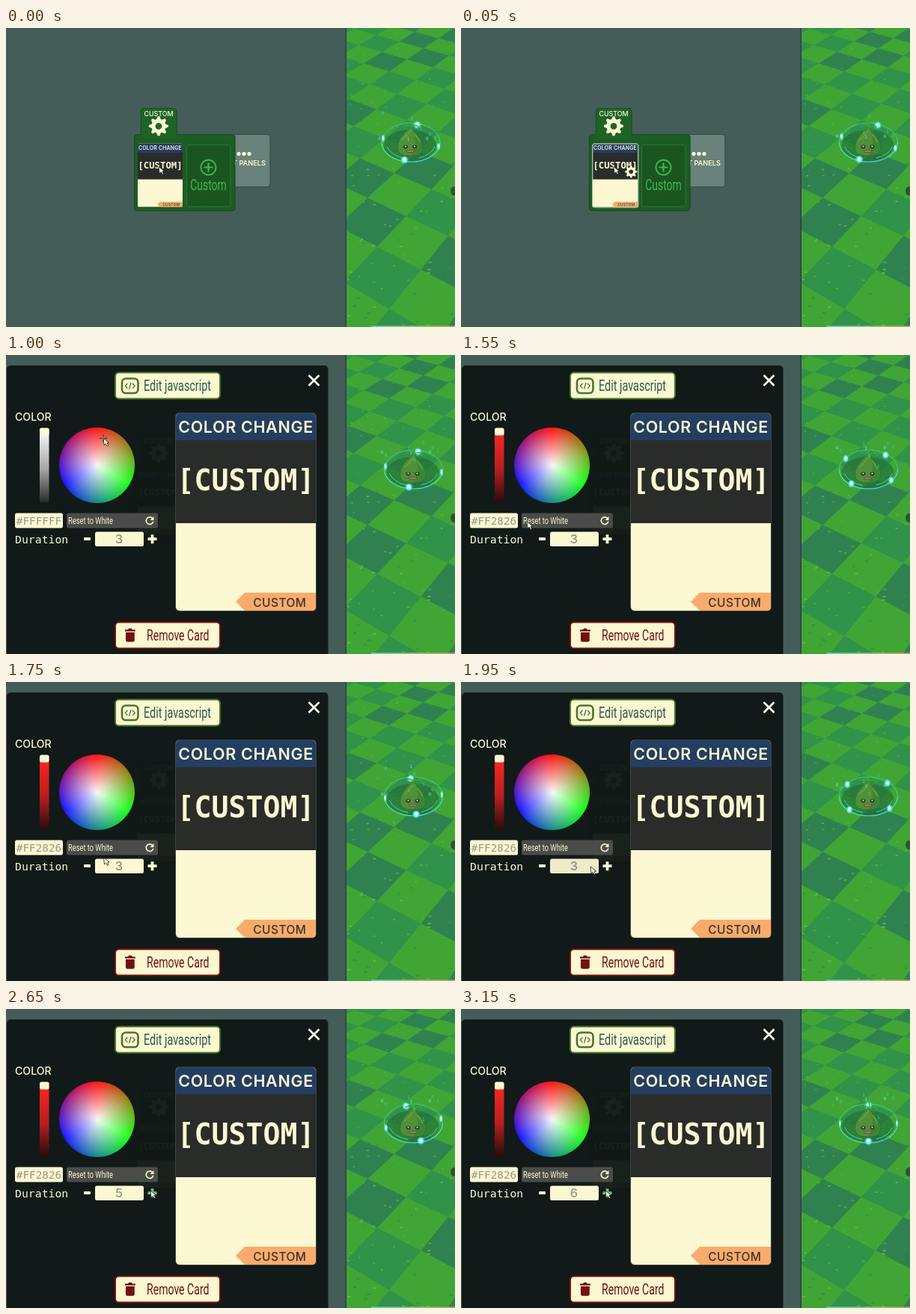
Write an HTML page with a canvas that moves like this. It is 600 by 400 pixels and loops after 3900 ms.

```html
<!DOCTYPE html>
<html lang="en">
<head>
<meta charset="utf-8">
<title>Card editor</title>
<style>
  html, body { margin: 0; width: 100%; height: 100%; overflow: hidden; background: #445d58; }
  canvas { display: block; }
</style>
</head>
<body>
<canvas id="stage" width="600" height="400"></canvas>
<script>
const stage = document.getElementById('stage');
const view = stage.getContext('2d');
let g = view;

const LOOP = 3900, TAU = Math.PI * 2;
const CREAM = '#fbf8d2', NAVY = '#243e62', INK = '#2a2c2a', ORANGE = '#f9ab6c';
const GEO = 'Inter, sans-serif';
const MONO = '"DejaVu Sans Mono", monospace';
const CONDENSED = 0.69;

// Moments at which the picture changes.
const run = (from, to) => Array.from({ length: (to - from) / 50 + 1 }, (_, i) => from + i * 50);
const TICKS = [0, 50, ...run(800, 1050), ...run(1550, 2150), 2650, 3150];

const lerp = (a, b, p) => a + (b - a) * p;
const ease = p => p * p * (3 - 2 * p);

// Value of [time, ...numbers] keys at time t.
function track(keys, t, shape = p => p) {
  if (t <= keys[0][0]) return keys[0].slice(1);
  for (let i = 1; i < keys.length; i++) {
    const [a, b] = [keys[i - 1], keys[i]];
    if (t < b[0]) {
      const p = shape((t - a[0]) / (b[0] - a[0]));
      return a.slice(1).map((v, n) => lerp(v, b[n + 1], p));
    }
  }
  return keys[keys.length - 1].slice(1);
}

function random(seed) {
  return () => (seed = (seed * 16807) % 2147483647) / 2147483647;
}

function paint(fill, line, width = 1) {
  if (fill) { g.fillStyle = fill; g.fill(); }
  if (line) { g.strokeStyle = line; g.lineWidth = width; g.stroke(); }
}

function box(x, y, w, h, r, fill, line, width) {
  g.beginPath();
  g.roundRect(x, y, w, h, r);
  paint(fill, line, width);
}

function poly(points, fill, line, width) {
  g.beginPath();
  points.forEach(p => g.lineTo(...p));
  g.closePath();
  paint(fill, line, width);
}

function path(d, fill, line, width) {
  const p = new Path2D(d);
  if (fill) { g.fillStyle = fill; g.fill(p, 'evenodd'); }
  if (line) { g.strokeStyle = line; g.lineWidth = width; g.stroke(p); }
}

function disc(x, y, rx, ry, fill, line, width) {
  g.beginPath();
  g.ellipse(x, y, rx, ry, 0, 0, TAU);
  paint(fill, line, width);
}

function text(s, x, y, font, fill, align = 'center') {
  g.font = font;
  g.fillStyle = fill;
  g.textAlign = align;
  g.textBaseline = 'alphabetic';
  g.fillText(s, x, y);
}

function narrow(s, x, y, size, fill, align) {
  g.save();
  g.translate(x, y);
  g.scale(CONDENSED, 1);
  text(s, 0, 0, `${size}px Roboto, sans-serif`, fill, align);
  g.restore();
}

function gear(x, y, r) {
  g.beginPath();
  for (let i = 0; i < 32; i++) {
    const k = i % 4 < 2 ? 1 : 0.74;
    const a = (i - 0.5) / 32 * TAU;
    g.lineTo(x + Math.cos(a) * r * k, y + Math.sin(a) * r * k);
  }
  g.closePath();
  g.moveTo(x + r * 0.34, y);
  g.arc(x, y, r * 0.34, 0, TAU);
  g.fillStyle = CREAM;
  g.fill('evenodd');
}

function cursor(x, y) {
  g.save();
  g.translate(x, y);
  path('M0 0L1 9L3.2 7.2L5 10.5L6.6 9.6L5 6.4L7.6 6Z', '#fffbe8', '#111a18', 0.8);
  g.restore();
}

// Checkered lawn in perspective.
function drawLawn() {
  const rnd = random(77);
  const project = (x, d) => {
    const depth = 5030 / d;
    return [540 + x * depth * 0.16, depth - 320];
  };
  const turn = Math.PI / 4 + 0.2, c = Math.cos(turn) * 0.707, s = Math.sin(turn) * 0.707;
  const distance = (i, j) => 7.72 + i * s + j * c;
  const corner = (i, j) => project(-0.35 + i * c - j * s, distance(i, j));

  g.save();
  g.beginPath();
  g.rect(455, 0, 145, 400);
  g.clip();
  g.fillStyle = '#40a535';
  g.fillRect(455, 0, 145, 400);
  const ring = [[-.5, -.5], [.5, -.5], [.5, .5], [-.5, .5]];
  for (let i = -6; i < 18; i++) {
    for (let j = -6; j < 18; j++) {
      const shade = rnd();
      if ((i + j) % 2 || distance(i, j) < 2) continue;
      poly(ring.map(([a, b]) => corner(i + a, j + b)), shade < 0.5 ? '#2f8250' : '#31924a');
    }
  }
  for (let i = 0; i < 150; i++) {
    const y = rnd() * 400, size = 1 + y / 250;
    g.fillStyle = ['#62b83c', '#2f9440', '#4caf38'][i % 3];
    g.fillRect(455 + rnd() * 145, y, size * (1 + rnd()), size * 0.8);
  }
  disc(599, 218, 5, 6, '#2b5336');
  const strip = g.createLinearGradient(488, 0, 600, 0);
  strip.addColorStop(0, '#63d8c3');
  strip.addColorStop(0.5, '#9fc77a');
  strip.addColorStop(1, '#d59a67');
  g.fillStyle = strip;
  g.fillRect(488, 398.5, 112, 1.5);
  g.restore();
  g.fillStyle = '#2c4142';
  g.fillRect(453.5, 0, 1.5, 400);
}

function drawCreature(tick) {
  const x = tick ? 544.5 : 541, y = 153;
  const [angle] = track([[0, 13], [1, 19], [2, 44], [8, 127], [16, 222], [21, 255], [22, 270]], tick);
  const orbs = [0, 1, 2, 3].map(i => {
    const a = (angle + i * 90) * TAU / 360;
    return { x: x + Math.cos(a) * 38, y: y + Math.sin(a) * 24, face: Math.abs(Math.sin(a)) };
  });
  // Flat plates that turn edge-on at the sides of the ring.
  const orb = o => {
    const w = 0.3 + 0.7 * o.face;
    disc(o.x, o.y, 5.4 * w, 5.2, 'rgba(60,215,215,.6)');
    disc(o.x, o.y, 3.6 * w, 3.8, '#8ff3ee');
    disc(o.x, o.y - 0.6, 1.8 * w, 2, '#e6fffb');
  };
  const arc = (rx, ry, from, to, line, width) => {
    g.beginPath();
    g.ellipse(x, y, rx, ry, 0, from, to);
    paint(null, line, width);
  };

  disc(x - 1, y + 4, 35, 21, 'rgba(32,108,58,.62)');
  arc(39, 26, Math.PI, TAU, '#36cda0', 1);
  orbs.filter(o => o.y < y).forEach(orb);

  g.save();
  g.translate(x - 1, y);
  path('M-17 7C-17 -5 -8 -12 2 -22C5 -12 17 -6 17 6C17 16 9 18 0 18S-17 16 -17 7Z', '#4f9038', '#2b7238', 1);
  path('M2 -22C6 -11 18 -5 16 8C13 17 6 17 1 17C10 5 7 -8 2 -22Z', 'rgba(45,125,43,.55)');
  path('M-11 -3C-6 -7 -4 -9 1 -16M6 -11C11 -6 12 -3 13 0', null, '#74a846', 1.2);
  path('M2 -21C1 -28 3 -32 4 -35M2 -20Q-5 -26 -10 -21M2 -20Q9 -26 13 -18', null, '#36ad35', 1.3);
  for (const ex of [-6, 6]) {
    disc(ex, 6, 3, 2.4, '#263c30');
    disc(ex, 5.5, 1.1, 1, '#e9e5c2');
  }
  path('M-6 11Q0 9 6 11L4 14H-4Z', '#70513e');
  path('M-4 12H4', null, '#cfa58a', 1);
  g.restore();

  arc(39, 26, 0, Math.PI, '#48e0d0', 1.2);
  arc(33, 22, 0.25, 1.25, '#43d5bb', 1);
  arc(33, 22, 1.8, 2.9, '#43d5bb', 1);
  orbs.filter(o => o.y >= y).forEach(orb);

  const rnd = random(31);
  for (let i = 0; i < 9; i++) {
    const px = x + (rnd() - 0.5) * 84;
    const rise = (rnd() * 38 + tick * 3) % 38;
    text(i % 2 ? '1' : '0', px, y - rise, `6px ${MONO}`, i % 3 ? '#37cfaa' : '#6bebdf');
  }
}

function card(x, y, w, h, head, dark, tagW, tagH, sizes, baselines) {
  g.save();
  g.beginPath();
  g.roundRect(x, y, w, h, w / 38);
  g.clip();
  g.fillStyle = CREAM;
  g.fillRect(x, y, w, h);
  g.fillStyle = NAVY;
  g.fillRect(x, y, w, head);
  g.fillStyle = INK;
  g.fillRect(x, y + head, w, dark);
  const r = x + w, b = y + h;
  poly([[r, b - tagH], [r - tagW + tagH / 2, b - tagH], [r - tagW, b - tagH / 2],
        [r - tagW + tagH / 2, b], [r, b]], ORANGE);
  const mid = x + w / 2;
  text('[CUSTOM]', mid, y + baselines[1], `700 ${sizes[1]}px ${MONO}`, CREAM);
  g.letterSpacing = `${sizes[0] * 0.03}px`;
  text('COLOR CHANGE', mid, y + baselines[0], `600 ${sizes[0]}px ${GEO}`, CREAM);
  g.letterSpacing = `${sizes[2] * 0.03}px`;
  text('CUSTOM', r - tagW * 0.45, y + baselines[2], `500 ${sizes[2]}px ${GEO}`, '#3b342d');
  g.restore();
}

function drawDeck(hover) {
  box(290, 142.5, 63, 70, 4, '#69827c', '#354b48', 1.2);
  for (const x of [311, 318, 325]) disc(x, 168.3, 2.6, 2.6, CREAM);
  text('EDIT PANELS', 347, 184, `600 9.2px ${GEO}`, CREAM, 'right');

  box(180.5, 107.5, 47.5, 45, 4, '#1f6427', '#1a4d25', 1.2);
  box(171.5, 142.5, 134.5, 102, 4, '#1d5c22', '#1a4a25', 1.2);
  box(181, 140, 46.5, 8, [0, 0, 3, 3], '#1f6427');
  text('CUSTOM', 204, 117.5, `500 8.9px ${GEO}`, CREAM);
  gear(204, 131.3, 13);

  card(176, 154.5, 60, 85, 12.5, 35.5, 34, 7, [6.9, 12.3, 5], [8.8, 33.2, 83.3]);
  if (hover) {
    box(175.8, 155, 61, 85, 2, null, '#dce5cf', 1);
    gear(227.3, 192.3, 8.2);
  }

  g.setLineDash([1.5, 1]);
  box(241.5, 156.5, 58.5, 82.5, 2, '#1a5520', '#348a3e', 1);
  g.setLineDash([]);
  disc(270.5, 186.5, 10, 10, null, '#40b84c', 1.8);
  path('M264.5 186.5h12M270.5 180.5v12', null, '#40b84c', 2.2);
  narrow('Custom', 270.5, 216.5, 20.2, '#40b84c');
}

function drawPicker(red, aim) {
  text('COLOR', 12, 87.5, `500 14.1px ${GEO}`, CREAM, 'left');

  const bar = g.createLinearGradient(0, 98, 0, 197);
  bar.addColorStop(0, red ? '#ff2826' : '#ffffff');
  bar.addColorStop(0.55, red ? '#b81f1e' : '#a5a7a6');
  bar.addColorStop(1, red ? '#2a0c0c' : '#292b2a');
  box(45, 98, 12.5, 99, 2, bar);
  box(45, 97.5, 12.5, 10, 2.5, CREAM);

  const cx = 121.5, cy = 147.5, r = 50.5;
  const hue = g.createConicGradient(-Math.PI / 2, cx, cy);
  ['#f00', '#0f0', '#00f', '#f00'].forEach((color, i) => hue.addColorStop(i / 3, color));
  disc(cx, cy, r, r, hue);
  const glow = g.createRadialGradient(cx, cy, 0, cx, cy, r);
  glow.addColorStop(0, 'rgba(255,255,255,.95)');
  glow.addColorStop(1, 'rgba(255,255,255,.08)');
  disc(cx, cy, r, r, glow);
  if (!red) {
    g.save();
    g.translate(...aim);
    path('M-5 0h3.4M1.6 0h3.4M0 -5v3.4M0 1.6v3.4', null, '#303430', 1.2);
    g.restore();
  }

  box(12, 211.5, 64, 20, 2.5, CREAM);
  text(red ? '#FF2826' : '#FFFFFF', 44, 227, `14.3px ${MONO}`, '#99988a');
  box(81, 211.5, 122, 20, 2.5, '#4b4c49');
  narrow('Reset to White', 83, 226.2, 13.5, CREAM, 'left');
  path('M195.6 218.4A4.8 4.8 0 1 0 196.8 222.6', null, CREAM, 1.7);
  path('M197.5 216v5h-5z', CREAM);
}

function drawDuration(count, overField, overPlus) {
  text('Duration', 12, 251.5, `14.8px ${MONO}`, CREAM, 'left');
  box(104, 244, 9, 4, 1, CREAM);
  box(119, 236.5, 65, 19.5, 2.5, overField ? '#eeebc8' : CREAM);
  text(count, 151, 252, `500 16.5px ${GEO}`, overPlus ? '#88a18c' : '#8d8d82');
  path('M189.5 246.2h12M195.5 240.2v12', null, overPlus ? '#83b878' : CREAM, 3.8);
}

function drawPanel(red, aim, count, overField, overPlus) {
  box(1, 14, 429.5, 392, 5, 'rgba(15,23,21,.957)');

  box(146, 23.5, 140, 35, 5, CREAM, '#487527', 2);
  box(155, 31.5, 21.5, 19.5, 5, null, '#4a762e', 2.6);
  path('M162.5 38l-3.2 3.3l3.2 3.3M169 38l3.2 3.3l-3.2 3.3M167 37l-2.4 8.6', null, '#416a32', 1.2);
  narrow('Edit javascript', 184, 48, 20.9, '#2b5850', 'left');
  path('M404.5 27l14 14M418.5 27l-14 14', null, '#fffdec', 2.6);

  drawPicker(red, aim);
  drawDuration(count, overField, overPlus);

  box(226, 77, 189, 266, 6, '#3b4543');
  card(227, 78, 187, 264, 36, 111, 107, 24, [21.5, 38.2, 15.5], [25.7, 103, 258.5]);

  box(146, 357.5, 140, 35, 5, CREAM, '#790f0d', 2);
  path('M159 367.5h4l1.2-1.7h3.4l1.2 1.7h4v2.3h-13.8zM160 371h11.8v10.5q0 2.3-2.3 2.3h-7.2q-2.3 0-2.3-2.3z', '#711211');
  narrow('Remove Card', 188, 382, 20.4, '#711211', 'left');
}

const lawn = document.createElement('canvas');
lawn.width = 600;
lawn.height = 400;
g = lawn.getContext('2d');
g.fillStyle = '#445d58';
g.fillRect(0, 0, 600, 400);
drawLawn();
g = view;

function pointerAt(t) {
  if (t < 800) return [204, 185.5];
  if (t < 1550) return track([[800, 200, 167], [1050, 122, 105]], t, ease);
  return track([[1550, 88, 223], [1950, 173, 247], [2050, 193, 243]], t);
}

function draw(time) {
  const tick = TICKS.findLastIndex(at => at <= time);
  const t = TICKS[tick];
  const pointer = pointerAt(t);
  const [px, py] = pointer;

  g.drawImage(lawn, 0, 0);
  drawCreature(tick);
  drawDeck(t === 50);
  if (t >= 800) {
    const inWheel = Math.hypot(px - 121.5, py - 147.5) < 44;
    const aim = inWheel ? pointer : [121.5, 147.5];
    const count = 3 + [2150, 2650, 3150].filter(at => t >= at).length;
    const overField = px > 119 && px < 184 && py > 236 && py < 256;
    drawPanel(t >= 1050, aim, count, overField, px > 189);
  }
  cursor(px, py);
}

const start = performance.now();
function frame() {
  draw((performance.now() - start) % LOOP);
  requestAnimationFrame(frame);
}
frame();
</script>
</body>
</html>
```
